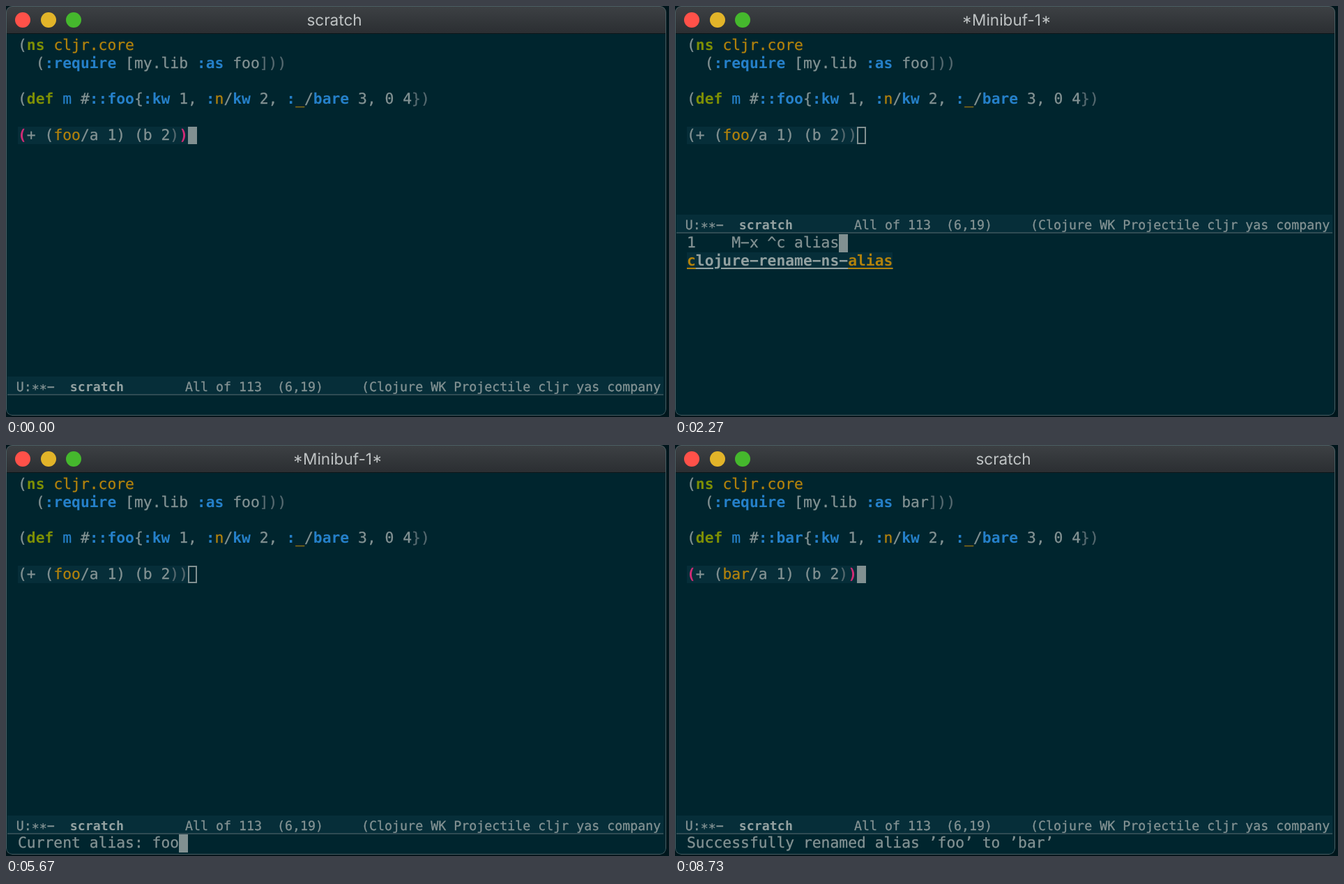
An HTML page that plays this animation: 951x589 px, repeating every 8.79 s.

```html
<!DOCTYPE html>
<html lang="en">
<head>
<meta charset="utf-8">
<title>Renaming a namespace alias</title>
<style>
  html, body { margin: 0; width: 100%; height: 100%; overflow: hidden; background: #00161c; }
  #window {
    position: absolute; left: 0; top: 0; width: 947px; height: 587px; box-sizing: border-box;
    overflow: hidden; border-radius: 9px; background: #00252e; color: #839293;
    font: 21.33px/25.7px "DejaVu Sans Mono", monospace;
    -webkit-text-stroke: .3px; text-rendering: geometricPrecision; white-space: pre;
  }
  #window::after {
    content: ""; position: absolute; inset: 0; border: 1px solid #4b5e63; border-radius: 9px;
  }
  #bar {
    position: absolute; left: 0; top: 0; width: 100%; height: 39px;
    background: linear-gradient(#3d4144, #2b2e32); border-bottom: 1px solid #0b1519;
  }
  #bar i { position: absolute; top: 9px; width: 22px; height: 22px; border-radius: 50%; }
  #title {
    position: absolute; left: 0; width: 942px; top: 0; text-align: center;
    font: 22.5px/41px Inter, sans-serif; color: #bfc3c4; -webkit-text-stroke: 0;
  }
  #title.mini { left: 4.5px; }
  #code, #mini { position: absolute; left: 17px; }
  #code { top: 44.3px; }
  .row { position: absolute; left: 0; height: 25.7px; }
  .line { background: #062e39; }
  .cursor { position: absolute; box-sizing: border-box; width: 12.84px; height: 25.7px; background: #819091; }
  .hollow { background: none; border: 2px solid #819091; }
  #mode {
    position: absolute; left: 2px; width: 941px; height: 25px; overflow: hidden;
    background: #062e39; border-bottom: 2px solid #2f4b53;
    font-size: 18.3px; line-height: 32px; text-indent: 12.8px;
  }
  b, .p, .pick { font-weight: 700; -webkit-text-stroke: 0; }
  .y { color: #b2820c; }
  .u { color: #2580c9; }
  .g { color: #7d8f04; }
  .d { color: #566a70; }
  .p { color: #d02b75; }
  .w { color: #93a1a1; }
  .pick { color: #93a1a1; background: #062e39; }
  .pick, .pick .y { text-decoration: underline; text-decoration-thickness: 2px; text-underline-offset: 2.5px; }
</style>
</head>
<body>
<div id="window">
  <div id="code"></div>
  <div id="mode"></div>
  <div id="mini"></div>
  <div id="bar">
    <div id="title"></div>
    <i style="left:13px;background:#ff5149"></i>
    <i style="left:49.5px;background:#e2b429"></i>
    <i style="left:86px;background:#45b82d"></i>
  </div>
</div>
<script>
const LOOP = 8790, CELL = 12.84, ROW = 25.7, TOP = 44.3;
const el = id => document.getElementById(id);
const tag = cls => text => `<span class="${cls}">${text}</span>`;
const yellow = tag('y'), blue = tag('u'), dim = tag('d'), pink = tag('p');
const key = text => `<b class="u">${text}</b>`;
const green = text => `<b class="g">${text}</b>`;

// Wide dashes and centred asterisks, as in the editor's typeface.
const show = (id, html) => { el(id).innerHTML = html.replace(/-/g, '−').replace(/\*/g, '∗'); };
const row = (i, html, cls = '') => `<div class="row ${cls}" style="top:${i * ROW}px">${html}</div>`;
const cursor = (r, c, cls = '') =>
  `<div class="cursor ${cls}" style="top:${r * ROW}px;left:${c * CELL}px"></div>`;

const candidates = {
  '^': ['2C-associate-buffer', `2C-command (${green('&lt;f2&gt;')})`, '2C-split', '2C-two-columns',
    '5x5', '5x5-crack', '5x5-crack-mutating-best', '5x5-crack-mutating-current', '5x5-crack-randomly'],
  '^c': ['c-add-style', 'c-backslash-region', 'c-backward-conditional', 'c-backward-subword',
    'c-beginning-of-defun', 'c-beginning-of-statement', 'c-context-line-break',
    'c-context-open-line', 'c-electric-backspace'],
  '^c a': ['c-add-style', 'c-guess-buffer-no-install', 'c-guess-install', 'c-guess-no-install',
    'c-guess-region-no-install', 'c-macro-expand', 'cal-html-cursor-month',
    'cal-html-cursor-year', 'cal-menu-context-mouse-menu'],
  '^c al': ['c-guess-buffer-no-install', 'c-guess-install', 'c-guess-no-install',
    'c-guess-region-no-install', 'cal-html-cursor-month', 'cal-html-cursor-year',
    'cal-menu-context-mouse-menu', 'cal-menu-global-mouse-menu', 'calc'],
  '^c ali': ['clojure-align', 'clojure-rename-ns-alias'],
  '^c alia': ['clojure-rename-ns-alias']
};
candidates['^c '] = candidates['^c'];
candidates['^c alias'] = candidates['^c alia'];

function highlight(name, input) {
  const [first, rest] = input.slice(1).split(' ');
  if (!first) return name;
  const at = rest ? name.indexOf(rest, 1) : -1;
  if (at < 0) return yellow(name[0]) + name.slice(1);
  return yellow(name[0]) + name.slice(1, at) + yellow(rest) + name.slice(at + rest.length);
}

const search = (count, input) => ({ count, input, mini: true });
const prompt = (text, home = false) => ({ text, home, mini: true });
const done = { text: 'Successfully renamed alias ’foo’ to ’bar’', alias: 'bar' };

const steps = [
  [0, { match: true }],
  [1200, { ...search(6796, '^'), match: true }],
  [1400, search(6796, '^')],
  [1470, search(1083, '^c')],
  [1600, search(1083, '^c ')],
  [1730, search(549, '^c a')],
  [1930, search(117, '^c al')],
  [2000, search(2, '^c ali')],
  [2130, search(1, '^c alia')],
  [2200, search(1, '^c alias')],
  [3930, prompt('Current alias: ')],
  [4800, prompt('Current alias: f')],
  [4930, prompt('Current alias: fo')],
  [5070, prompt('Current alias: foo')],
  [5730, prompt('New alias: ', true)],
  [6470, prompt('New alias: b', true)],
  [6600, prompt('New alias: ba', true)],
  [6730, prompt('New alias: bar', true)],
  [7330, done],
  [7470, { ...done, match: true }]
];

function draw({ mini, match, home, input, count, text = '', alias = 'foo' }) {
  const [open, close] = match ? [pink('('), pink(')')] : ['(', dim(')')];
  el('title').textContent = mini ? '*Minibuf-1*' : 'scratch';
  el('title').className = mini ? 'mini' : '';
  show('code',
    row(0, `(${green('ns')} ${yellow('cljr.core')}`) +
    row(1, `  (${key(':require')} [my.lib ${key(':as')} ${alias}${dim(']))')}`) +
    row(3, `(${green('def')} ${blue('m')} #${key('::' + alias)}{${key(':kw')} 1, ` +
      `${key(':')}${yellow('n')}/${key('kw')} 2, ${key(':')}${yellow('_')}/${key('bare')} 3, 0 4${dim('})')}`) +
    row(5, `${open}+ (${yellow(alias)}/a 1) (b 2${dim(')')}${close}`, 'line') +
    (home ? cursor(0, 0, 'hollow') : cursor(5, 19, mini ? 'hollow' : '')));

  const miniTop = TOP + (input ? 11 : 20) * ROW;
  el('mode').style.top = miniTop - 27.6 + 'px';
  show('mode', `U:**-  <b class="w">scratch</b>        All of 113  ` +
    `${(home ? '(1,0)' : '(6,19)').padEnd(11)}(Clojure WK Projectile cljr yas company`);

  el('mini').style.top = miniTop + 'px';
  const line = input ? `${String(count).padEnd(4)} M-x ${input}` : text;
  const list = (candidates[input] || []).map((name, i) =>
    row(i + 1, highlight(name, input), i ? '' : 'pick'));
  show('mini', row(0, line) + list.join('') + (mini ? cursor(0, line.length) : ''));
}

let current;
function tick() {
  const t = performance.now() % LOOP;
  const step = steps.findLast(([start]) => start <= t);
  if (step !== current) draw((current = step)[1]);
  requestAnimationFrame(tick);
}
tick();
</script>
</body>
</html>
```
